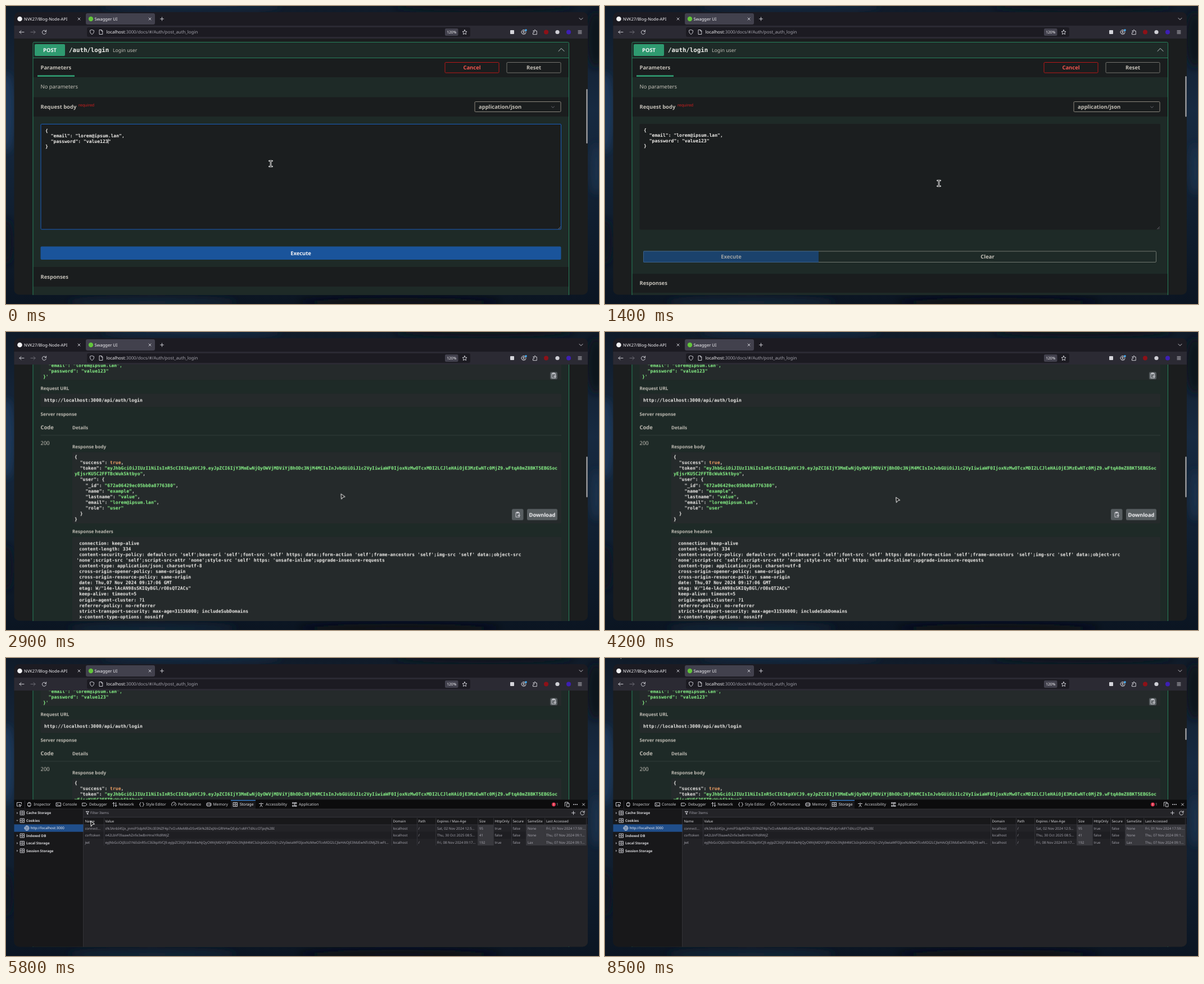
Animation, 1055 px wide and 531 px high, one loop 8.6 s. Source, as an HTML page:

```html
<!DOCTYPE html>
<html lang="en">
<head>
<meta charset="utf-8">
<title>Login request demo</title>
<style>
html, body { margin: 0; width: 100%; height: 100%; overflow: hidden; background: #0d1723; }
svg { display: block; width: 1055px; height: 531px; }
text { font-family: "Noto Sans", "Open Sans", sans-serif; white-space: pre; fill: #c4c0b8; text-rendering: geometricPrecision; }
.b { font-weight: 700; }
.mono { font-family: "DejaVu Sans Mono", "Liberation Mono", monospace; font-weight: 700; fill: #f1efec; }
.mid { text-anchor: middle; }
.white { fill: #f4f3f6; }
.ui { fill: #d6d6da; }
.dim { fill: #a3a2ab; }
.blue { fill: #8cc4ff; }
.red { fill: #d41f1f; }
.g { fill: #8bf98b; }
.o { fill: #f5a468; }
.ico { fill: none; stroke: #dcdce2; stroke-width: .9; stroke-linecap: round; stroke-linejoin: round; }
.faint { stroke: #73727b; }
</style>
</head>
<body>
<svg id="stage" viewBox="0 0 1055 531" xmlns="http://www.w3.org/2000/svg"></svg>
<script>
const LOOP = 8600;
const SMALL = 8.07, BODY = 9.42;

// Drawing helpers; y is the optical middle of the text line.
const T = (x, y, s, size = BODY, cls = '') =>
  `<text x="${x}" y="${(y + size * .36).toFixed(2)}" font-size="${size}" class="${cls}">${s}</text>`;
const R = (x, y, x2, y2, fill, rx = 0, more = '') =>
  `<rect x="${x}" y="${y}" width="${x2 - x}" height="${y2 - y}" rx="${rx}" fill="${fill}" ${more}/>`;
const box = (x, y, x2, y2, stroke, fill = 'none') => R(x, y, x2, y2, fill, 1.5, `stroke="${stroke}"`);
const I = (x, y, d, cls = '') => `<path class="ico ${cls}" transform="translate(${x} ${y})" d="${d}"/>`;
const dot = (x, y, r, fill) => `<circle cx="${x}" cy="${y}" r="${r}" fill="${fill}"/>`;
const G = (id, body) => `<g id="${id}">${body}</g>`;
// ~text~ is a string, ^text^ a literal
const paint = s => s.replace(/~(.*?)~/g, '<tspan class="g">$1</tspan>')
                    .replace(/\^(.*?)\^/g, '<tspan class="o">$1</tspan>');
const code = (x, y, lines, pitch = 10.06) =>
  lines.map((s, i) => T(x, y + i * pitch, paint(s), SMALL, 'mono')).join('');

const CROSS = 'M-2-2L2 2M-2 2L2-2', PLUS = 'M-3 0H3M0-3V3', CHEVRON = 'M-3-1.5L0 1.5L3-1.5';
const CLIP = 'M-3-4H3V4H-3ZM-1.5-5H1.5V-3H-1.5ZM4 1H0M1.5-.5L0 1L1.5 2.5';
const GREEN = '#1e2a27', BAR = '#1a1d1e', CODE = '#252a2b', EMAIL = 'lorem@ipsum.lan';

const part = o => btoa(JSON.stringify(o)).replace(/=/g, '');
const id = '672a06429ec05bb0a8776380';
const token = part({ alg: 'HS256', typ: 'JWT' }) + '.' +
  part({ id, role: 'user', iat: 1730971026, exp: 1731057426 }) + '.wFtqA0mZ8BKT5EBGSoc';

function wallpaper() {
  const blob = (x, y, rx, ry, c) => `<ellipse cx="${x}" cy="${y}" rx="${rx}" ry="${ry}" fill="${c}"/>`;
  return `<defs>
    <linearGradient id="sky" x2="0" y2="1"><stop offset="0" stop-color="#101b29"/>
      <stop offset=".35" stop-color="#172a41"/><stop offset=".6" stop-color="#122235"/>
      <stop offset="1" stop-color="#0b1522"/></linearGradient>
    <filter id="soft"><feGaussianBlur stdDeviation="7"/></filter>
    <clipPath id="win"><rect x="14.5" y="11" width="1020.5" height="503.5" rx="9"/></clipPath>
    <clipPath id="view"><rect x="14" y="58" width="1022" height="457"/></clipPath></defs>
    ${R(0, 0, 1055, 531, 'url(#sky)')}
    <g filter="url(#soft)">${blob(0, 190, 16, 70, '#1c3958')}${blob(1050, 60, 18, 50, '#0c121b')}
    ${blob(1050, 290, 10, 45, '#1b334c')}${blob(0, 420, 14, 40, '#0b1420')}
    ${blob(330, 0, 160, 9, '#182b42')}${blob(850, 0, 160, 9, '#0d151f')}
    ${blob(260, 528, 150, 8, '#152639')}${blob(700, 528, 180, 8, '#091019')}</g>`;
}

function chrome() {
  return R(14, 11, 1036, 36, '#1c1b22') + R(14, 35, 1036, 58, '#2b2a33') +
    R(142, 13, 265, 33, '#42414d', 3) + dot(24.5, 23, 4.3, '#f3f3f5') + dot(151, 23, 4.2, '#62c53b') +
    T(32, 23.2, 'NVK27/Blog-Node-API', 7.45, 'white') + T(157.5, 23.2, 'Swagger UI', 7.5, 'white') +
    I(130, 23, CROSS) + I(256, 23, CROSS) + I(277.5, 23, PLUS) + I(1023, 23, CHEVRON) +
    I(28, 46.5, 'M4 0H-4M-1-3L-4 0L-1 3') + I(48, 46.5, 'M-4 0H4M1-3L4 0L1 3', 'faint') +
    I(68, 46.5, 'M3.2-1A3.5 3.5 0 1 0 3.4 1M3.6-3.6V-1H1') +
    R(144, 38, 826, 55, '#1c1b22', 3) +
    I(153, 46.5, 'M0-4L3.5-2.8C3.5 1 2.5 2.8 0 4C-2.5 2.8-3.5 1-3.5-2.8Z') +
    I(169, 46.5, 'M-2.6-4H1L2.8-2V4H-2.6ZM.8-4V-1.8H2.8') +
    T(178.5, 46.3, '<tspan class="white">localhost</tspan>:3000/docs/#/Auth/post_auth_login', 7.84, 'dim') +
    R(781, 40, 804.5, 53, '#42414d', 2) + T(792.7, 46.6, '120%', 6.7, 'mid white') +
    I(816, 46.5, 'M0-4L1.2-1.3L4-1L1.9 1L2.5 4L0 2.5L-2.5 4L-1.9 1L-4-1L-1.2-1.3Z') +
    R(897, 43, 904, 50, '#d4d4da', 1) +
    I(921, 46.5, 'M-4 0A4 4 0 1 0 4 0A4 4 0 1 0-4 0M-1.3-1A1.3 1.3 0 1 0 1.3-1A1.3 1.3 0 1 0-1.3-1M-2.4 2.8Q0 0 2.4 2.8') +
    dot(925, 43, 1.8, '#3fb1ff') +
    I(941, 46.5, 'M-3.5 3.8V1Q-1 1-1-.5T-3.5-2H-1.2Q-1.5-4 0-4T1.2-2H3.3V3.8Z') +
    dot(961, 46.5, 4, '#8d1118') + dot(981, 46.5, 3.6, '#cfcfd6') + dot(1001, 46.5, 4, '#3d1fb4') +
    I(1021, 46.5, 'M-3-2.5H3M-3 0H3M-3 2.5H3');
}

const bar = (y, y2) => R(48, y, 1001, y2, BAR);

function page() {
  const body = ['{', `  "email": "${EMAIL}",`, '  "password": "value123"', '}'];
  const top = R(48, 64.5, 1001.5, 1400, GREEN, 2) +
    R(51, 68, 105, 89, '#2f9a70', 2) + T(78, 78.3, 'POST', BODY, 'b mid white') +
    T(112, 78, '/auth/login', 10.76, 'mono') + T(190, 78.5, 'Login user', 8.74) +
    I(988, 78, 'M-5 2.5L0-2.5L5 2.5') +
    bar(93, 127) + T(61.5, 110, 'Parameters', BODY, 'b') + R(56, 123.3, 122, 126, '#2f9a70') +
    box(781, 100.5, 877, 119, '#b81818') + T(829, 110, 'Cancel', BODY, 'b mid" style="fill:#f2564f') +
    box(891, 100.5, 987, 119, '#74746f') + T(939, 110, 'Reset', BODY, 'b mid') +
    T(61.5, 143.3, 'No parameters') +
    bar(162.5, 197) + T(61.5, 180, 'Request body', BODY, 'b') + T(129, 176.8, 'required', 7, 'red') +
    box(834, 170.5, 987, 188.5, '#8b877d') + T(841, 180, 'application/json', BODY, 'b') +
    I(973, 180, 'M-2.5-1L0 1.3L2.5-1', 'faint') +
    R(61.5, 210, 988, 398.5, '#1b1e1f', 2) + I(984.5, 395.5, 'M2-2L-2 2M2 .5L.5 2', 'faint') +
    G('blurred', code(69, 221.2, body, 9.33)) +
    G('focused', box(62, 210.5, 987.5, 398, '#1a5fc0') + code(70, 222.2, body, 9.33)) +
    G('caret', R(181.6, 236.5, 182.4, 245.5, '#f0f0f0'));
  const before = R(61.5, 428.5, 987.5, 452, '#1a549b', 2) + T(524.5, 440.3, 'Execute', BODY, 'b mid white') +
    bar(465, 500) + T(61.5, 482.8, 'Responses', BODY, 'b');
  const after = box(68.5, 437, 980.5, 456.5, '#70766f') +
    G('run', `<rect id="runBox" x="68" y="436.5" width="457" height="20.5" fill="#1a549b"/>` +
      G('runText', T(296.5, 447, 'Execute', BODY, 'b mid white'))) +
    G('clearText', T(752.5, 447, 'Clear', BODY, 'b mid')) +
    bar(477.2, 511) + T(61.5, 494, 'Responses', BODY, 'b');
  const frame = `<path d="M48 1400V66.5Q48 64.5 50 64.5H999.5Q1001.5 64.5 1001.5 66.5V1400M48 92.5H1001.5" fill="none" stroke="#27805c"/>`;
  return top + G('before', before) + G('after', after +
    G('result', `<g transform="translate(0 373.5)">${result()}</g>`)) + frame;
}

function result() {
  const label = (x, y, s) => T(x, y, s, SMALL, 'b');
  const button = (x, x2, y, y2) => R(x, y, x2, y2, '#575d60', 2.5);
  return label(61.5, 163.5, 'Curl') + R(61.5, 173, 988, 259, CODE, 2) +
    code(66, 181.8, [`curl -X ~'POST'~ \\`, `  ~'http://localhost:3000/api/auth/login'~ \\`,
      `  -H ~'accept: */*'~ \\`, `  -H ~'Content-Type: application/json'~ \\`, `  -d ~'{~`,
      `~  "email": "${EMAIL}",~`, `~  "password": "value123"~`, `~}'~`]) +
    button(968, 981, 244.5, 257.5) + I(974.5, 251.2, CLIP) +
    label(61.5, 273.7, 'Request URL') + R(61.5, 283, 988, 307, CODE, 2) +
    code(68, 294.7, ['http://localhost:3000/api/auth/login']) +
    label(61.5, 319.3, 'Server response') + T(61.5, 343.5, 'Code', BODY, 'b') + label(118, 343.4, 'Details') +
    R(61.5, 357, 988, 357.8, '#3a4542') + T(61.5, 371.5, '200') + label(118, 377.6, 'Response body') +
    R(118, 387, 988, 514.5, CODE, 2) +
    code(122, 395.8, ['{', '  "success": ^true^,', `  "token": ~"${token}~`, '~yEjsrKU5C2FFTBcWukSktbyo"~,',
      '  "user": {', `    "_id": ~"${id}"~,`, '    "name": ~"example"~,', '    "lastname": ~"value"~,',
      `    "email": ~"${EMAIL}"~,`, '    "role": ~"user"~', '  }', '}']) +
    button(900, 920.5, 488.5, 508.5) + I(910.5, 499, CLIP) +
    button(927, 981, 488.5, 508.5) + T(954, 499, 'Download', BODY, 'b mid white') +
    label(118, 528.3, 'Response headers') + R(118, 538, 988, 760, CODE, 2) +
    code(125.3, 549.5, [' connection: keep-alive', ' content-length: 334',
      ` content-security-policy: default-src 'self';base-uri 'self';font-src 'self' https: data:;form-action 'self';frame-ancestors 'self';img-src 'self' data:;object-src`,
      `'none';script-src 'self';script-src-attr 'none';style-src 'self' https: 'unsafe-inline';upgrade-insecure-requests`,
      ' content-type: application/json; charset=utf-8', ' cross-origin-opener-policy: same-origin',
      ' cross-origin-resource-policy: same-origin', ' date: Thu,07 Nov 2024 09:17:06 GMT',
      ' etag: W/"14e-lAcAN98sSKIQyBGl/rO8sQT2ACs"', ' keep-alive: timeout=5', ' origin-agent-cluster: ?1',
      ' referrer-policy: no-referrer', ' strict-transport-security: max-age=31536000; includeSubDomains',
      ' x-content-type-options: nosniff']);
}

const TABS = [
  [41.5, 49.5, 'Inspector', 'M-2.5-2.5H2.5V2.5H-2.5ZM-1-4V-2.5M1-4V-2.5M-1 4V2.5M1 4V2.5'],
  [93.5, 101, 'Console', 'M-4-3H4V3H-4ZM-2.5-1L-1 .3L-2.5 1.5M.5 1.5H2'],
  [140, 148, 'Debugger', 'M-4-2.5H1.5L4 0L1.5 2.5H-4Z'],
  [193.5, 200.5, 'Network', 'M-2 3.5V-3.5L-4-1.5M-2-3.5L0-1.5M2-3.5V3.5L0 1.5M2 3.5L4 1.5'],
  [241.5, 249, 'Style Editor', 'M-1.5-3.5Q-3-3.5-3-1.5T-4 0Q-3 0-3 1.5T-1.5 3.5M1.5-3.5Q3-3.5 3-1.5T4 0Q3 0 3 1.5T1.5 3.5'],
  [298.5, 306, 'Performance', 'M-3 2.5A4 4 0 1 1 3 2.5M0 1.5L1.5-1.5'],
  [361, 368.5, 'Memory', 'M-2.5-3H2.5V3H-2.5ZM-4-2V2M4-2V2M0-1.5V1.5'],
  [408, 416, 'Storage', 'M-3.5-3.5H3.5V3.5H-3.5ZM-3.5 0H3.5M-1-1.8H1M-1 1.8H1'],
  [454, 462, 'Accessibility', 'M-3.5-1.5H3.5M0-1.5V1L-2 4M0 1L2 4M0-3.5V-3.4'],
  [513.5, 521, 'Application', 'M-3.5-3.5H-1.5V-1.5H-3.5ZM1.5-3.5H3.5V-1.5H1.5ZM-3.5 1.5H-1.5V3.5H-3.5ZM1.5 1.5H3.5V3.5H1.5ZM0-3.5V3.5']
];

function devtools() {
  const active = (i, x, x2) => R(x, 253, x2, 269, '#19191c') + R(x, 253, x2, 254.2, '#3a8fe8') +
    I(TABS[i][0], 261, TABS[i][3]) + T(TABS[i][1], 261, TABS[i][2], 6.72, 'white');
  const rule = (x, y, x2, y2) => R(x, y, x2, y2, '#3c3c42');
  const tabs = TABS.map(([x, tx, s, d]) => I(x, 261, d) + T(tx, 261, s, 6.72, 'ui')).join('');
  return R(14, 252.5, 1036, 515, '#232327') + R(14, 252.5, 1036, 269, '#0c0c0d') +
    I(23.5, 261, 'M-1 3H-4V-3.5H4V-1M0 0L4 1.5L2 2L1.5 4Z') + rule(33, 254, 33.7, 268) + tabs +
    dot(974.5, 261, 3.4, '#e2354f') + T(974.5, 261, '!', 5.5, 'b mid white') + T(979, 261, '1', 6.5, 'dim') +
    I(998, 261, 'M-3.5 3V-4H2V-2M0-2H4V4H0Z') +
    [-3, 0, 3].map(d => dot(1013 + d, 261, .9, '#dcdce2')).join('') + I(1027.5, 261, CROSS) +
    G('inspector', active(0, 34, 83.5) + rule(14, 268.7, 1036, 269.4) + rule(14, 283, 643, 283.7) +
      rule(642.3, 269, 643, 515) + rule(838.3, 269, 839, 515) + rule(14, 499.5, 643, 500.2) + rule(608, 271, 608.7, 281) +
      search(22) + T(27, 276.2, 'Search HTML', 6.2, 'dim') + I(617.5, 276, PLUS) +
      I(633, 276, 'M-3.5 3.5L-3 1.5L.5-2L2 -.5L-1.5 3ZM.5-3L3 -.5M1.5-2L3-3.5')) +
    G('storage', active(7, 400, 444) + rule(14, 268.7, 1036, 269.4) + storage(rule));
}

const search = x => I(x, 275.5, 'M-2.2-.5A2 2 0 1 0 1.8-.5A2 2 0 1 0-2.2-.5M1.2 1L3 3');

function storage(rule) {
  const heads = ['Cache Storage', 'Cookies', '', 'Indexed DB', 'Local Storage', 'Session Storage'];
  const tree = heads.map((s, i) => {
    const y = 276.2 + i * 13.45;
    if (!s) return R(14, y - 6.7, 137.5, y + 6.6, '#204e8a') +
      I(37, y, 'M-4 0A4 4 0 1 0 4 0A4 4 0 1 0-4 0M-4 0H4M0-4Q-3.5 0 0 4Q3.5 0 0-4') +
      T(43.5, y, 'http://localhost:3000', 6.2, 'white');
    const arrow = i === 1 ? 'M-2-1H2L0 1.4Z' : 'M-1-2V2L1.5 0Z';
    return `<path transform="translate(20 ${y})" d="${arrow}" fill="#8d8d95"/>` +
      I(29, y, TABS[7][3]) + T(36, y, s, 6.2, 'b ui');
  }).join('');
  const cols = [138, 174, 686, 731, 764.5, 839.5, 867, 899, 925.5, 958.5];
  const rows = [
    ['Name', 'Value', 'Domain', 'Path', 'Expires / Max-Age', 'Size', 'HttpOnly', 'Secure', 'SameSite', 'Last Accessed'],
    ['connect…', 's%3AnbI4SJx_jnmiP3dpNFZKcIE0NZF4p7xO.vMeM8vDSv4Sk%2BZeJXnGRhHwQEvJv1oMY7dXccOTpq%2BI', 'localhost', '/',
      'Sat, 02 Nov 2024 12:5…', '95', 'true', 'false', 'None', 'Fri, 01 Nov 2024 17:59:…'],
    ['csrftoken', 'n42LbVFI9aawhZnfe3wBnHnxiYRdRWjZ', 'localhost', '/',
      'Thu, 30 Oct 2025 08:5…', '41', 'false', 'false', 'None', 'Thu, 07 Nov 2024 09:1…'],
    ['jwt', token.slice(0, 149) + '…', 'localhost', '/',
      'Fri, 08 Nov 2024 09:17…', '192', 'true', 'false', 'Lax', 'Thu, 07 Nov 2024 09:1…']
  ];
  const shade = [5, 8, 9].map(i => R(cols[i], 297, cols[i + 1] || 1032, 334, '#38383d')).join('');
  const cells = rows.map((r, j) => r.map((s, i) =>
    T(cols[i] + 2.4, j ? 291.3 + j * 12.35 : 290.8, s, 6.16, j ? 'dim' : 'ui')).join('')).join('');
  return R(14, 269.4, 137.5, 515, '#18181a') + rule(137, 269, 137.7, 515) + tree +
    I(145, 276, 'M-2.5-2.5H2.5L.7 0V2.8L-.7 2V0Z') + T(150, 276.2, 'Filter Items', 6.2, 'dim') +
    I(1009.5, 276, PLUS) + I(1025.5, 276, 'M3.2-1A3.5 3.5 0 1 0 3.4 1M3.6-3.6V-1H1') +
    rule(138, 283, 1036, 283.7) + R(138, 284.5, 1036, 297, '#18181a') + rule(138, 296.7, 1036, 297.3) +
    R(138, 309.5, 1032, 322, '#1e1e22') + shade + cols.slice(1).concat(1032).map(x => rule(x, 285, x + .7, 334)).join('') + cells;
}

function cursor() {
  const ink = 'fill="#111" stroke="#fff" stroke-linejoin="round"';
  return G('beam', `<path d="M-2.5-5H2.5M-2.5 5H2.5M0-5V5" stroke="#fff" stroke-width="2.6" stroke-linecap="round"/>
      <path d="M-2.5-5H2.5M-2.5 5H2.5M0-5V5" stroke="#111" stroke-width=".9"/>`) +
    G('arrow', `<path d="M.6.8L7.6 5.8L4 6.6L1.3 10.2Z" ${ink}/>`) +
    G('hand', `<path d="M-1.5 6V1Q0-.5 1.2 1V4.5L5.5 5.5Q6.5 6 6 8L5 11.5H-.5L-4 7.5Q-3.5 5.8-1.5 7Z" ${ink}/>`);
}

document.getElementById('stage').innerHTML = wallpaper() +
  `<g clip-path="url(#win)">${R(14, 11, 1036, 515, '#1b1d1e')}
   <g clip-path="url(#view)">${G('page', page())}</g>
   ${G('barBefore', R(1032.5, 148, 1034.5, 245, '#b4b4b8', 1))}
   ${G('barAfter', R(1032.5, 125, 1034.5, 197.5, '#b4b4b8', 1))}
   ${G('devtools', devtools())}
   ${G('barShort', R(1032.5, 125, 1034.5, 146, '#b4b4b8', 1))}
   ${chrome()}</g>` + G('cursor', cursor());

// Motion: points are [ms, value]; movement advances ten times a second.
function anim(name, prop, pts, hard) {
  const all = [...pts, [LOOP, pts[pts.length - 1][1]]];
  const frames = all.map(([t, v], i) => {
    const next = i + 1 < all.length ? all[i + 1][0] : t;
    const n = hard ? 1 : Math.max(1, Math.round((next - t) / 100));
    return { offset: t === LOOP ? 1 : Math.max(0, t - 4) / LOOP, [prop]: v, easing: `steps(${n}, end)` };
  });
  document.getElementById(name).animate(frames, { duration: LOOP, iterations: Infinity });
}
// Alternating times of appearing and vanishing.
const show = (name, ...times) =>
  anim(name, 'opacity', [[0, times[0] ? 0 : 1], ...times.filter(t => t).map(t => [t, times.indexOf(t) % 2 ? 0 : 1])], true);
const move = (name, pts) => anim(name, 'transform', pts.map(([t, x, y]) => [t, `translate(${x}px, ${y}px)`]));

show('focused', 0, 1000);
show('blurred', 1000);
show('caret', 0, 500, 900, 1000);
show('before', 0, 1300);
show('after', 1300);
show('result', 1500);
show('barBefore', 0, 1300);
show('barAfter', 1300, 4300);
show('devtools', 4300);
show('inspector', 4300, 5500);
show('storage', 5500);
show('barShort', 4300, 5300, 7700);
show('beam', 0, 600, 1200, 2400);
show('arrow', 600, 800, 1100, 1200, 2400);
show('hand', 800, 1100);

const scroll = [[0, 0], [1400, 0], [1500, 45], [1600, 135], [1700, 235], [1800, 315], [1900, 373.5], [2000, 490], [2100, 546.7]];
move('page', scroll.map(([t, s]) => [t, 0, -s]));
move('barAfter', scroll.map(([t, s]) => [t, 0, s * .1775]));

anim('runBox', 'width', [[0, '200px'], [1300, '200px'], [1400, '312px'], [1500, '410px'], [1600, '457px']]);
anim('run', 'opacity', [[0, .6], [1400, .6], [1600, 1]]);
const split = [[0, -128, 0], [1300, -128, 0], [1400, -72, 0], [1500, -23, 0], [1600, 0, 0]];
move('runText', split);
move('clearText', split);

move('cursor', [[0, 471, 281], [200, 490, 296], [400, 545, 350], [600, 605, 410], [800, 633, 437], [1000, 633, 437],
  [1400, 594, 316], [1900, 594, 304], [2100, 594, 300], [2300, 594, 300], [2400, 594.5, 291], [2500, 595, 288.5],
  [2800, 595, 288.5], [2900, 595.5, 287.7], [4100, 595.5, 287.7], [4500, 282, 312], [4600, 282, 312],
  [4700, 281, 298.7], [4900, 281, 298.7], [5300, 421, 261], [5400, 421, 261], [5800, 150, 290], [6000, 75, 303],
  [6100, 75, 303], [6300, 136, 326], [6600, 177, 335], [6900, 208, 343], [7200, 190, 331], [7700, 228, 235],
  [8100, 190, 130], [8500, 27, -9.5]]);
</script>
</body>
</html>
```
